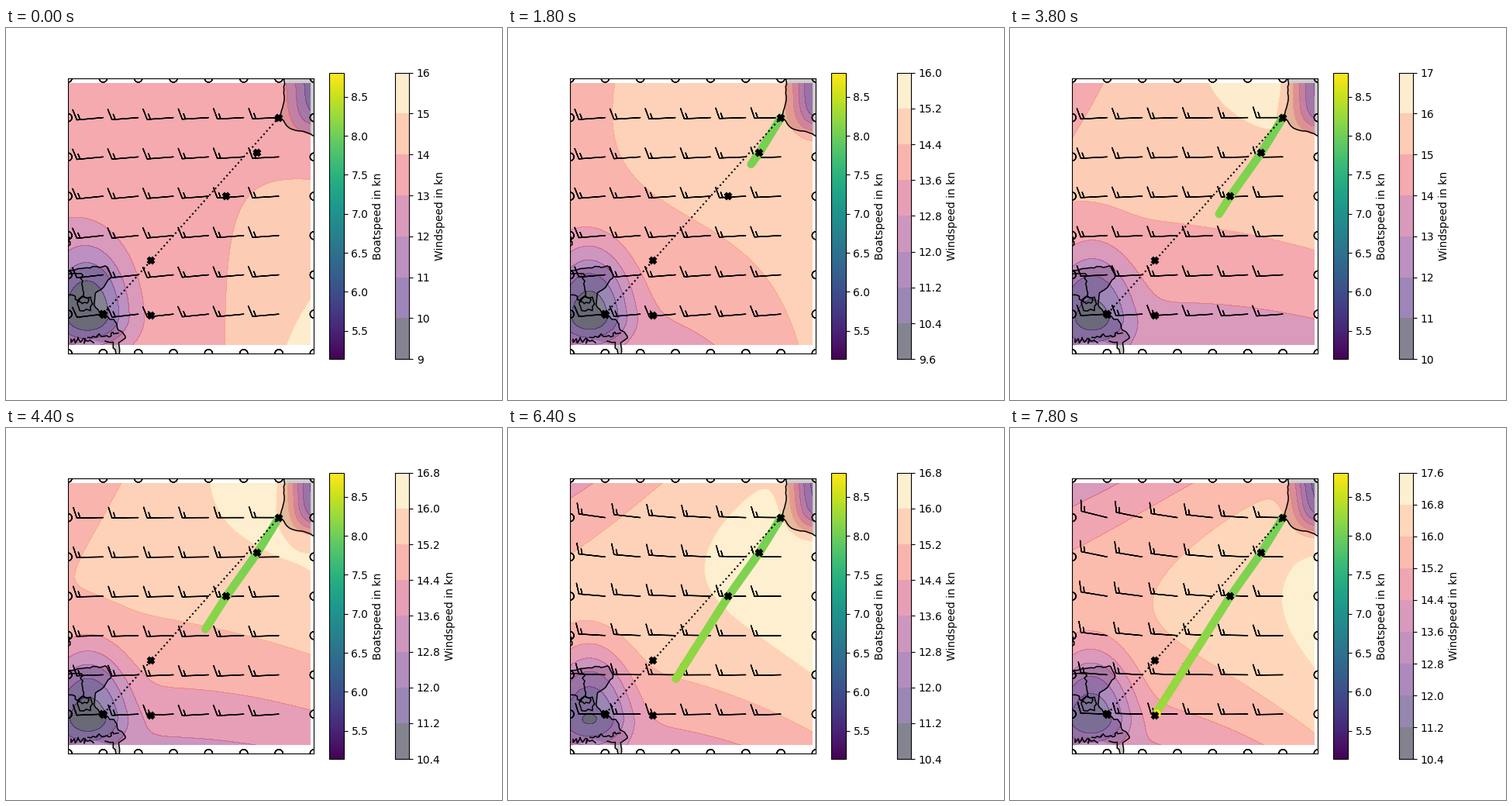
Animation of 640x480 px, one loop 8000 ms. Source, as a matplotlib script:

```python
import numpy as np
import matplotlib.pyplot as plt
from matplotlib.animation import FuncAnimation
from matplotlib.collections import LineCollection
from matplotlib.colors import Normalize

W, H = 640, 480
FRAMES, STEP_MS = 40, 200
LEFT, RIGHT, TOP, BOTTOM = 80, 397.44, 64.9, 419.9

fig = plt.figure(figsize=(W / 100, H / 100), dpi=100, facecolor="white")
rng = np.random.default_rng(4)


def box(x, y, w, h):
    return fig.add_axes([x / W, 1 - (y + h) / H, w / W, h / H])


ax = box(LEFT, TOP, RIGHT - LEFT, BOTTOM - TOP)
boat_ax = box(417.28, 57.6, 18.48, 369.6)
wind_ax = box(501.6, 57.6, 18.48, 369.6)
ax.set(xlim=(LEFT, RIGHT), ylim=(BOTTOM, TOP), xticks=[], yticks=[])

# ---- wind: a smooth sheet over open water minus two lulls over land

# speed at the corners, edge middles and centre: begin, halfway, end
SHEETS = np.array([
    [[13.5, 13.85, 13.5], [13.2, 13.8, 14.25], [13.2, 13.6, 15.5]],
    [[14.6, 15.95, 16.4], [15.05, 15.15, 15.45], [13.4, 13.3, 13.5]],
    [[13.8, 15.2, 16.1], [15.7, 16.2, 17.05], [14.2, 14.6, 15.8]],
])
SW_DEPTH = np.array([3.9, 3.2, 3.4])
NE_DEPTH = np.array([3.4, 5.0, 5.0])
# wind angle in degrees: top left, top right / bottom left, bottom right
TILTS = np.array([[[5, 2.5], [7, 5]], [[3, 0], [3, 4]], [[-14, -1], [-2, 1]]])


def stage(values, s):
    """Blend begin, halfway and end values at loop position s in 0..1."""
    i = 0 if s < 0.5 else 1
    f = 2 * s - i
    return (1 - f) * values[i] + f * values[i + 1]


def quadratic(u):
    return np.array([u * (u - 1) / 2, 1 - u * u, u * (u + 1) / 2])


def sigmoid(v):
    return 1 / (1 + np.exp(-v))


def wind(s, x, y):
    z = quadratic((y - 240) / 169).T @ stage(SHEETS, s) @ quadratic((x - 236.5) / 156.5)
    dx = (x - 105) / 52
    dy = (y - 370) / np.where(y < 370, 85, 38)
    r = np.hypot(dx[None, :], dy[:, None])
    sw = np.exp(-r ** 2.5)
    ne = sigmoid((126 - y) / 10)[:, None] * sigmoid((x - 375) / 9)[None, :]
    return z - stage(SW_DEPTH, s) * sw - stage(NE_DEPTH, s) * ne


# start time, lowest level, highest level, step
SCALES = [(0, 9, 16, 1), (800, 8.8, 16, 0.8), (1600, 9.6, 16, 0.8),
          (2600, 9.6, 16.8, 0.8), (3800, 10, 17, 1), (4400, 10.4, 16.8, 0.8),
          (6800, 10.4, 17.6, 0.8)]


def levels_at(ms):
    _, lo, hi, step = [s for s in SCALES if s[0] <= ms][-1]
    return np.linspace(lo, hi, round((hi - lo) / step) + 1), 0 if step == 1 else 1


# ---- coast

def rough(points, jitter=0.7, gap=4):
    """Line through the points with small seeded wiggles."""
    p = np.array(points, float)
    d = np.append(0, np.cumsum(np.hypot(*np.diff(p, axis=0).T)))
    t = np.linspace(0, d[-1], int(d[-1] / gap) + 2)
    line = np.column_stack([np.interp(t, d, c) for c in p.T])
    line[1:-1] += rng.normal(0, jitter, line[1:-1].shape)
    return line


def blob(cx, cy, rx, ry):
    a = np.linspace(0, 2 * np.pi, 15)
    r = 1 + 0.3 * rng.uniform(-1, 1, a.size)
    r[-1] = r[0]
    return np.column_stack([cx + rx * r * np.cos(a), cy + ry * r * np.sin(a)])


def inlet(x0, x1, y, swing):
    x = np.linspace(x0, x1, 16) + rng.uniform(-2.5, 2.5, 16)
    return np.column_stack([x, y + swing * rng.uniform(-1, 1, 16)])


ne_coast = rough([(359, 64), (359, 97), (353, 115), (361, 124), (368, 131),
                  (386, 134), (399, 140)], 0.4)
sw_coast = rough([(78, 314), (95, 310), (130, 307), (137, 321), (127, 333),
                  (114, 343), (115, 360), (126, 371), (140, 377), (145, 390),
                  (156, 398), (146, 406), (146, 422)])
details = [
    rough([(78, 317), (98, 317), (98, 334), (100, 345)]),
    rough([(78, 343), (88, 345), (94, 352)]),
    blob(102, 356, 9, 9), blob(100, 351, 6, 4),
    inlet(82, 112, 403, 4), inlet(108, 143, 396, 4),
    rough([(143, 422), (138, 412), (140, 406), (128, 404)]),
    blob(79, 276, 3.5, 6),
]
LAND = "0.8"
ax.fill(*ne_coast.T, color=LAND, lw=0, zorder=0)
ax.fill(*np.vstack([ne_coast[[0, -1]], [(399, 64)]]).T, color=LAND, lw=0, zorder=0)
ax.fill(*np.vstack([sw_coast, [(143, 422), (138, 410), (110, 402), (78, 411)]]).T,
        color=LAND, lw=0, zorder=0)
for line in [ne_coast, sw_coast] + details:
    ax.plot(*line.T, color="black", lw=1.1, zorder=1.5)

# ---- barbs, route and track

nx = np.linspace(LEFT, RIGHT, 8)
ny = np.linspace(TOP, BOTTOM, 8)
NX, NY = np.meshgrid(nx, ny)
inner = np.zeros(NX.shape, bool)
inner[1:-1, 1:-1] = True
ramp = (np.arange(8) - 1) / 5
blend = np.array([1 - ramp, ramp])
barbs = ax.barbs(NX, NY, np.where(inner, 15, 0), 0 * NX, zorder=2)

start, goal = (nx[6], ny[1]), (nx[1], ny[6])
bends = [(324.2, 161), (284.2, 217.3)]
arrive = (186.5, 371)
marks = [start, *bends, (186.5, 300.3), arrive, goal, (goal[0] + 0.8, goal[1] + 0.8)]
ax.plot(*zip(start, goal), "k:", lw=1.5, zorder=3)
ax.plot(*zip(*marks), "kX", ms=6, mew=1.5, zorder=4)

track = np.array([start, *bends, arrive])
track_d = np.append(0, np.cumsum(np.hypot(*np.diff(track, axis=0).T)))
speed_norm = Normalize(5.138, 8.81)
trail = LineCollection([], cmap="viridis", norm=speed_norm, linewidths=7.5,
                       capstyle="round", zorder=2.5)
ax.add_collection(trail, autolim=False)
arrival, = ax.plot([], [], "o", ms=6.5, color=plt.cm.viridis(0.985), zorder=2.6)

bar = fig.colorbar(plt.cm.ScalarMappable(speed_norm, "viridis"), cax=boat_ax)
bar.set_label("Boatspeed in kn")


def draw_scale(levels, digits):
    wind_ax.cla()
    n = len(levels) - 1
    for i in range(n):
        wind_ax.axhspan(levels[i], levels[i + 1], lw=0, alpha=0.5,
                        color=plt.cm.magma((i + 0.5) / n))
    wind_ax.set(xlim=(0, 1), ylim=(levels[0], levels[-1]), xticks=[])
    wind_ax.yaxis.tick_right()
    wind_ax.yaxis.set_label_position("right")
    wind_ax.set_yticks(levels, [f"{v:.{digits}f}" for v in levels])
    wind_ax.set_ylabel("Windspeed in kn")


def draw_trail(frame):
    dist = 8 * frame - 0.0075 * frame ** 2
    d = np.linspace(0, dist, max(2, int(dist / 4)))
    p = np.column_stack([np.interp(d, track_d, c) for c in track.T])
    trail.set_segments(np.stack([p[:-1], p[1:]], axis=1) if frame else [])
    trail.set_array(8.02 + 0.25 * d[:-1] / 300 if frame else np.array([]))
    arrival.set_data(*(p[-1:].T if frame == FRAMES - 1 else ([], [])))


gx = np.linspace(LEFT, 393, 106)
gy = np.linspace(71, 409, 114)
shown = []


def draw(frame):
    s = frame / (FRAMES - 1)
    levels, digits = levels_at(frame * STEP_MS)
    z = np.clip(wind(s, gx, gy), levels[0] + 0.01, levels[-1] - 0.01)
    while shown:
        shown.pop().remove()
    shown.append(ax.contourf(gx, gy, z, levels=levels, cmap="magma",
                             alpha=0.5, zorder=1))
    draw_scale(levels, digits)

    angle = np.radians(blend.T @ stage(TILTS, s) @ blend)
    speed = np.where(inner, wind(s, nx, ny), 0)
    barbs.set_UVC(speed * np.cos(angle), speed * np.sin(angle))
    draw_trail(frame)
    return []


anim = FuncAnimation(fig, draw, frames=FRAMES, interval=STEP_MS, repeat=True,
                     init_func=lambda: draw(0))
plt.show()
```
